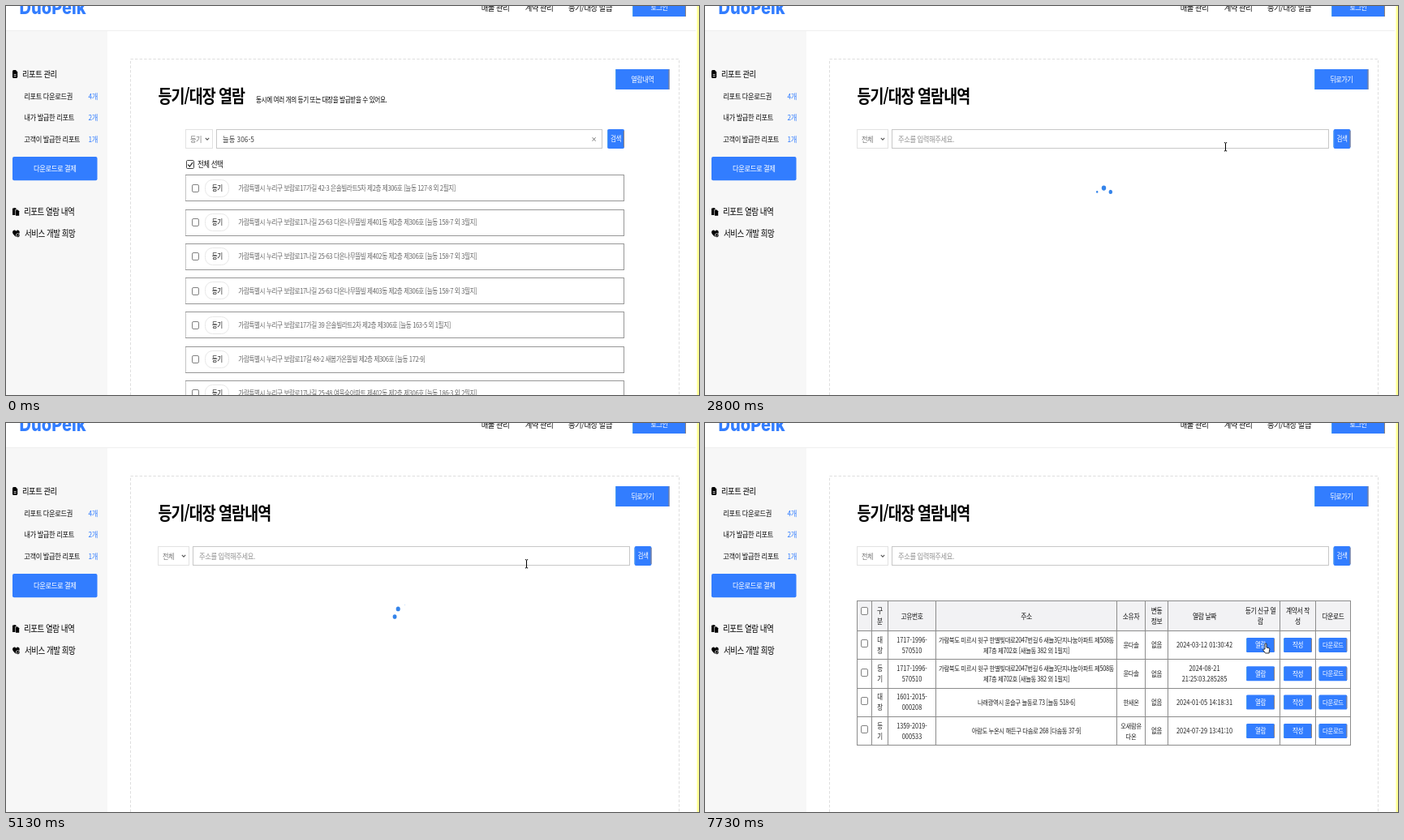
An HTML page that plays this animation: 854x480 px, repeating every 8 s.

```html
<!DOCTYPE html>
<html lang="ko">
<head>
<meta charset="utf-8">
<title>등기/대장 열람</title>
<style>
  html, body { margin: 0; width: 100%; height: 100%; overflow: hidden; background: #fff; }
  svg { display: block; width: 100%; height: 100%; }
  text { font-family: "Noto Sans CJK KR", "Noto Sans CJK", "Noto Sans", sans-serif; }
  .brand { font-family: Inter, sans-serif; }
</style>
</head>
<body>
<svg id="stage" viewBox="0 0 854 480" preserveAspectRatio="none"></svg>
<script>
const LOOP = 8000, STEP = 1000 / 15;
const SQUEEZE = 0.865; // the whole page is shown slightly narrowed
const BLUE = '#327dff';
const OPEN_AT = 1466, LOADED_AT = 5199;

// ---- drawing helpers ----
const rect = (x, y, w, h, fill, more = '') =>
  `<rect x="${x}" y="${y}" width="${w}" height="${h}" fill="${fill}" ${more}/>`;
const frame = (x, y, w, h, color, r = 0) =>
  rect(x, y, w, h, '#fff', `stroke="${color}" rx="${r}"`);
const path = (d, stroke, width = 1, fill = 'none') =>
  `<path d="${d}" stroke="${stroke}" stroke-width="${width}" fill="${fill}"/>`;

// y is the optical middle of the line
function text(x, y, size, str, { fill = '#111', weight = 400, anchor = 'start', gap = -0.05 } = {}) {
  return `<text transform="translate(${x} ${y + size * 0.375}) scale(${SQUEEZE} 1)" font-size="${size}"` +
    ` letter-spacing="${gap * size}" font-weight="${weight}" fill="${fill}" text-anchor="${anchor}">${str}</text>`;
}
const mid = (x, y, size, str, o = {}) => text(x, y, size, str, { anchor: 'middle', ...o });

// centred lines of a table cell
const cell = (x, y, size, lines, o) =>
  lines.map((s, i) => mid(x, y + (i - (lines.length - 1) / 2) * 13, size, s, o)).join('');

function button(x, y, w, h, label, size, { r = 0, bevel = true } = {}) {
  const edges = bevel
    ? path(`M${x + .5} ${y + r}v${h - 2 * r}`, '#4a9cf0') +
      path(`M${x + w - .5} ${y + r}v${h - 2 * r}`, '#8f827f')
    : '';
  return rect(x, y, w, h, BLUE, `rx="${r}"`) + edges +
    mid(x + w / 2, y + h / 2, size, label, { fill: '#fff', weight: 500 });
}

const snap = v => Math.round(v) + .5;
const box = (cx, cy) => frame(snap(cx - 4.3), snap(cy - 4.8), 8, 9, '#808080', 1.6);
const chevron = (x, y) => path(`M${x - 2.2} ${y - 1.2}l2.2 2.4 2.2 -2.4`, '#555', 1.1);

function searchBar(x, selW, label, inX, inW, btnX) {
  return frame(x + .5, 152.5, selW, 23, '#e2e2e2') +
    text(x + 6, 164, 9.4, label, { fill: '#777' }) + chevron(x + selW - 6, 164) +
    frame(inX + .5, 152.5, inW, 23, '#c8c8c8') +
    button(btnX, 152, 21, 24, '검색', 8.7, { r: 2 });
}
const heading = str => text(187.5, 111.5, 21.3, str, { weight: 700, fill: '#000' });

// ---- shared page ----
function shell() {
  const head = { weight: 500, fill: '#000' };
  const counts = [['리포트 다운로드권', '4개'], ['내가 발급한 리포트', '2개'], ['고객이 발급한 리포트', '1개']];
  return rect(0, 0, 854, 480, '#fff') +
    rect(0, 31, 125, 449, '#f7f7f7') +
    path('M0 30.5H850', '#efefef') +
    rect(851, 0, 1, 480, '#ffffc8') + rect(852, 0, 2, 480, '#ffff92') +
    `<text class="brand" transform="translate(16.5 10) scale(${SQUEEZE} 1)" font-size="23.2" font-weight="800" fill="${BLUE}">DuoPelk</text>` +
    mid(603, 1.5, 10.8, '매물 관리') + mid(657, 1.5, 10.8, '계약 관리') +
    mid(720, 1.5, 10.8, '등기/대장 발급') +
    button(772, -10, 66, 23, '로그인', 9.4) +
    // sidebar icons
    path('M8 80.5q0-1.5 1.5-1.5h2.5l2.2 2.6v6q0 1.4-1.4 1.4H9.5q-1.5 0-1.5-1.5z', 'none', 0, '#000') +
    path('M9.6 84.6h3M9.6 86.6h3', '#fff', .8) +
    path('M8 249.8l3-.9 1.6.9v1.2h-1.2v7H8z', 'none', 0, '#000') +
    path('M12 251.4h2.6l1.6 1.8v5.6H12z', 'none', 0, '#000') +
    path('M12.4 285q-4.4-3.4-4.4-6 .2-2.4 2.3-2.5 1.5 0 2.1 1.4.7-1.4 2.2-1.4 2 .2 2.2 2.6 0 2.4-4.4 5.9z', 'none', 0, '#000') +
    `<circle cx="14.7" cy="283" r="2.4" stroke="#f7f7f7" stroke-width=".7"/>` +
    path('M13.7 283l.8.8 1.3-1.6', '#fff', .6) +
    text(20, 84, 10.8, '리포트 관리', head) +
    counts.map(([name, n], i) =>
      text(22.3, 111.5 + i * 26.3, 9.6, name) +
      text(113, 111.5 + i * 26.3, 9.6, n, { fill: BLUE, anchor: 'end' })).join('') +
    button(8, 186, 104.5, 29.2, '다운로드로 결제', 9.65, { r: 2, bevel: false }) +
    text(22, 254, 11, '리포트 열람 내역', head) +
    text(23, 280.5, 11, '서비스 개발 희망', head) +
    `<path d="M153.5 480V65.5H829.5V480" fill="none" stroke="#dedede" stroke-dasharray="3.4 2.2"/>`;
}

// ---- result list ----
function listView() {
  const area = '가람특별시 누리구 보람로17';
  const rows = [
    '가길 42-3 은솔빌라트5차 제2층 제306호 [늘동 127-8 외 2필지]',
    '나길 25-63 다온나무뜰빌 제401동 제2층 제306호 [늘동 158-7 외 3필지]',
    '나길 25-63 다온나무뜰빌 제402동 제2층 제306호 [늘동 158-7 외 3필지]',
    '나길 25-63 다온나무뜰빌 제403동 제2층 제306호 [늘동 158-7 외 3필지]',
    '가길 39 은솔빌라트2차 제2층 제306호 [늘동 163-5 외 1필지]',
    '길 48-2 새봄가온뜰빌 제2층 제306호 [늘동 172-9]',
    '나길 25-48 여울숲아파트 제402동 제2층 제306호 [늘동 186-3 외 2필지]'
  ];
  return heading('등기/대장 열람') +
    text(308, 116, 8.8, '동시에 여러 개의 등기 또는 대장을 발급받을 수 있어요.', { weight: 500, fill: '#000' }) +
    button(751, 78, 66.5, 25, '열람내역', 9.4) +
    searchBar(221, 33, '등기', 259, 475, 741) +
    text(267, 164, 9.6, '늘동 306-5', { fill: '#444', gap: 0 }) +
    path('M722.6 162.2l4 4.4M726.6 162.2l-4 4.4', '#666', .9) +
    frame(222.5, 190.5, 9, 10, '#444', 1.2) + path('M224.2 195.6l2.2 2.4 3.6-4.8', '#222', 1.2) +
    text(236, 195.5, 9.8, '전체 선택') +
    rows.map((addr, i) => {
      const offset = i * 42.25;
      const top = Math.floor(208.8 + offset) + .5, bottom = Math.floor(240.8 + offset) + .5;
      const c = 224.7 + offset;
      return frame(221.5, top, 540, bottom - top, '#979797') + box(233.7, c) +
        path(`M221.5 ${top + .5}V${bottom - .5}`, '#c4c4c4') +
        frame(245.5, snap(c - 11), 29, 21, '#e8e8e8', 9) +
        mid(260.3, c, 8.7, '등기') +
        text(286.3, c, 8.75, area + addr, { fill: '#666' });
    }).join('');
}

// ---- history page ----
function historyView() {
  return heading('등기/대장 열람내역') +
    button(751, 78, 66.5, 25, '뒤로가기', 9.4) +
    searchBar(187, 38, '전체', 230, 538, 774.5) +
    text(238, 164, 9.6, '주소를 입력해주세요.', { fill: '#929292' });
}

function table() {
  const edges = [187.5, 205.5, 225.5, 284.5, 507.5, 542.5, 570.5, 660.5, 708.5, 752.5, 795.5];
  const lines = [219.5, 256.5, 291.5, 327.5, 362.5, 397.5];
  const hidden = 660.5;
  const cx = i => (edges[i] + edges[i + 1]) / 2;
  const heads = ['구/분', '고유번호', '주소', '소유자', '변동/정보', '열람 날짜', '등기 신규 열/람', '계약서 작/성', '다운로드'];
  const home = ['가람북도 미르시 윗구 한별빛대로2047번길 6 새늘3단지나눔아파트 제508동', '제7층 제702호 [새늘동 382 외 1필지]'];
  const data = [
    ['대장', '1717-1996-/570510', home, '윤다솔', '2024-03-12 01:30:42'],
    ['등기', '1717-1996-/570510', home, '윤다솔', '2024-08-21/21:25:03.285285'],
    ['대장', '1601-2015-/000208', ['나래광역시 윤슬구 늘동로 73 [늘동 518-6]'], '한새온', '2024-01-05 14:18:31'],
    ['등기', '1359-2019-/000533', ['아람도 누온시 해든구 다솜로 268 [다솜동 37-9]'], '오새람유/다온', '2024-07-29 13:41:10']
  ];
  const num = { gap: 0, fill: '#222' }, plain = { fill: '#222' };
  const body = data.map(([kind, id, addr, owner, date], i) => {
    const y = 274 + i * 35.3;
    return box(196.7, y - 2) +
      cell(cx(1), y, 8.6, [...kind], plain) +
      cell(cx(2), y, 8.5, id.split('/'), num) +
      cell(cx(3), y, 8.5, addr, plain) +
      cell(cx(4), y, 8.5, owner.split('/'), plain) +
      mid(cx(5), y, 8.6, '없음', plain) +
      cell(cx(6), y, 8.6, date.split('/'), num) +
      button(667, y - 9, 35, 18, '열람', 8.7, { r: 1.5 }) +
      button(713, y - 9, 35, 18, '작성', 8.7, { r: 1.5 }) +
      button(756.5, y - 9, 34.8, 18, '다운로드', 8.5, { r: 1.5 });
  }).join('');
  return rect(187.5, 219.5, 608, 37, '#f2f2f4') +
    lines.map(y => path(`M187 ${y}H796`, '#8c8c8c')).join('') +
    edges.filter(x => x !== hidden).map(x => path(`M${x} 219.5V397.5`, '#8c8c8c')).join('') +
    box(196.7, 231.5) +
    heads.map((h, i) => cell(cx(i + 1), 238.4, 9, h.split('/'), { weight: 500 })).join('') + body;
}

// ---- spinner: eight dots, a peak runs clockwise ----
const EM = 4.8, SPIN = 1300;
function spinner(t) {
  const p = ((t - OPEN_AT) / SPIN * 8) % 8;
  let out = '';
  for (let i = 0; i < 8; i++) {
    const away = Math.abs(i - p), d = Math.min(away, 8 - away);
    const r = EM * (d < 1 ? 0.7 - 0.2 * d : 1.5 - d);
    if (r <= 0.1) continue;
    const a = i * Math.PI / 4, reach = EM * (i % 2 ? Math.SQRT2 * 2 : 3);
    out += `<ellipse cx="${491.5 + Math.sin(a) * reach * SQUEEZE}" cy="${239 - Math.cos(a) * reach}"` +
      ` rx="${r * SQUEEZE}" ry="${r}" fill="#3584ea"/>`;
  }
  return out;
}

// ---- pointer: time, x, y of its hot spot ----
const track = [
  [333, 5, 153], [733, 704, 82], [800, 704, 82], [1130, 780, 95], [1333, 776, 91], [1400, 776, 91],
  [1933, 743, 138], [2267, 626, 184], [2533, 641.5, 173.7], [5933, 641.5, 173.7],
  [6400, 567, 280], [6800, 567, 280], [6933, 571, 280], [7200, 571, 280],
  [7467, 700, 268], [7600, 700, 268], [7733, 691, 272]
];
const shapes = {
  arrow: path('M.4 .4V9.8L2.2 8.1 3.5 11 4.7 10.4 3.5 7.6H5.7Z', '#000', .8, '#fff'),
  beam: path('M-1.7-5h1.2L0-4.4 .5-5h1.2M0-4.4V4.6M-1.7 5.2h1.2L0 4.6l.5.6h1.2', '#000', 1),
  hand: path('M-1 7V.9a1 1 0 0 1 2 0V5l3 .8q1 .3 .8 1.5L4.2 10.4V12H-.5L-3 8.6q-.6-1.3.6-1.5z', '#000', .8, '#fff')
};
const ease = u => u * u * (3 - 2 * u);

function pointerAt(t) {
  let i = track.findIndex(k => k[0] > t);
  if (i < 0) i = track.length;
  const a = track[i - 1], b = track[i] || a;
  const u = a === b ? 0 : ease((t - a[0]) / (b[0] - a[0]));
  return [a[1] + (b[1] - a[1]) * u, a[2] + (b[2] - a[2]) * u];
}

function pointer(t) {
  if (t < track[0][0]) return '';
  const [x, y] = pointerAt(t);
  const inside = (l, top, r, bottom) => x >= l && x <= r && y >= top && y <= bottom;
  const onButton = inside(751, 78, 818, 103) || (t >= LOADED_AT && inside(667, 265, 702, 283));
  const kind = onButton ? 'hand' : t >= OPEN_AT && inside(230, 152, 769, 176) ? 'beam' : 'arrow';
  return `<g transform="translate(${x} ${y})">${shapes[kind]}</g>`;
}

// ---- stage ----
const stage = document.getElementById('stage');
stage.innerHTML = shell() +
  `<g id="list">${listView()}</g><g id="visits">${historyView()}</g>` +
  `<g id="grid">${table()}</g><g id="spin"></g><g id="mouse"></g>`;
const [list, visits, grid, spin, mouse] =
  ['list', 'visits', 'grid', 'spin', 'mouse'].map(id => document.getElementById(id));
const show = (el, on) => el.setAttribute('display', on ? 'inline' : 'none');

function draw(now) {
  const t = Math.floor((now % LOOP + 4) / STEP) * STEP + 0.5;
  const opened = t >= OPEN_AT, loaded = t >= LOADED_AT;
  show(list, !opened);
  show(visits, opened);
  show(grid, loaded);
  spin.innerHTML = opened && !loaded ? spinner(t) : '';
  mouse.innerHTML = pointer(t);
}

function tick() {
  draw(performance.now());
  requestAnimationFrame(tick);
}
tick();
</script>
</body>
</html>
```
